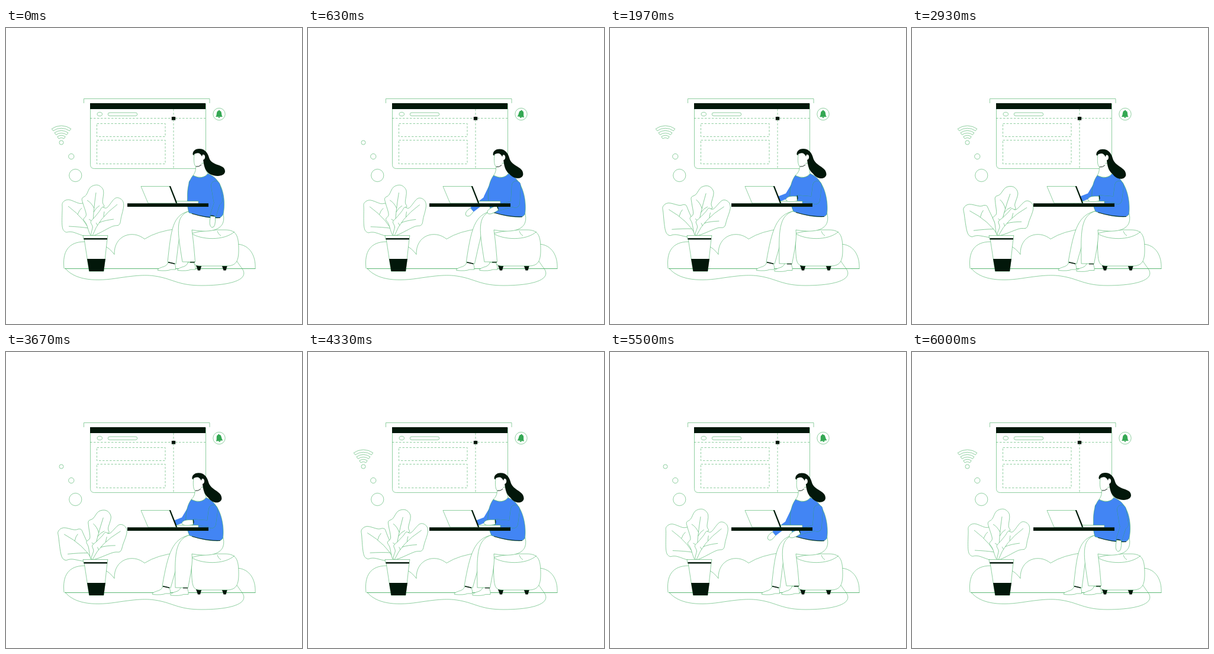
These frames come from a looping animation (500x500 px, 6030 ms). An HTML page with a canvas:

```html
<!DOCTYPE html>
<html lang="en">
<head>
<meta charset="utf-8">
<title>Working at a desk</title>
<style>
html, body { margin: 0; width: 100%; height: 100%; overflow: hidden; background: #fff; }
canvas { display: block; width: 500px; height: 500px; }
</style>
</head>
<body>
<canvas id="stage" width="500" height="500"></canvas>
<script>
const c = document.getElementById('stage').getContext('2d');
const LOOP = 6030;
const GREEN = '#34a853', DARK = '#02170a', BLUE = '#4285f4', WHITE = '#fff';
const THIN = 0.55;
const RAD = Math.PI / 180;

const clamp = v => Math.min(1, Math.max(0, v));
const seg = (t, a, b) => clamp((t - a) / (b - a));
const ease = p => p * p * (3 - 2 * p);
const mix = (a, b, k) => a + (b - a) * k;
const mixAll = (a, b, k) => a.map((v, i) => mix(v, b[i], k));
const wave = (t, period) => (1 - Math.cos(2 * Math.PI * t / period)) / 2;
// 0 -> 1 -> 0 with eased flanks
const hold = (t, a, b, d, e) => ease(seg(t, a, b)) - ease(seg(t, d, e));

function shape(d, fill, line, width = THIN) {
  const p = new Path2D(d);
  if (fill) { c.fillStyle = fill; c.fill(p); }
  if (line) { c.strokeStyle = line; c.lineWidth = width; c.stroke(p); }
}

const outline = (d, fill = WHITE) => shape(d, fill, GREEN);
const stroke = (d, color = GREEN, width = THIN) => shape(d, null, color, width);

function circle(x, y, r, ry = r) {
  outline(`M${x - r} ${y}a${r} ${ry} 0 1 0 ${2 * r} 0a${r} ${ry} 0 1 0 ${-2 * r} 0`);
}

function box(x, y, w, h, color) {
  c.fillStyle = color;
  c.fillRect(x, y, w, h);
}

function placed(x, y, degrees, draw) {
  c.save();
  c.translate(x, y);
  c.rotate(degrees * RAD);
  draw();
  c.restore();
}

// Smooth closed curve through points
function smooth(points) {
  const n = points.length, at = i => points[(i + n) % n];
  let d = `M${points[0]}`;
  for (let i = 0; i < n; i++) {
    const [a, b, e, f] = [at(i - 1), at(i), at(i + 1), at(i + 2)];
    d += `C${b.map((v, k) => v + (e[k] - a[k]) / 6)} ${e.map((v, k) => v - (f[k] - b[k]) / 6)} ${e}`;
  }
  return d + 'Z';
}

function browser() {
  stroke('M131.5 127V119.5H344V127');
  outline('M142.5 128H337.5V237.5H149.5Q142.5 237.5 142.5 230.5Z');
  box(142, 127, 195, 10, DARK);
  circle(158.3, 145.5, 4.2, 3.2);
  outline('M175 143H219a2.7 2.7 0 0 1 0 5.4H175a2.7 2.7 0 0 1 0 -5.4Z');
  c.setLineDash([3.5, 2.5]);
  stroke('M142 152.5H337M283 137V237M153.5 161.5h115.5v22h-115.5ZM153.5 189.5h115.5v40h-115.5Z');
  c.setLineDash([]);
  box(279.8, 150, 6.4, 5.6, DARK);
}

function bell(t) {
  circle(360, 145.5, 10.2);
  placed(360, 145.5, 9 * Math.sin(Math.PI * t / 1000), () => {
    shape('M-6 4.6C-3 2 -5.5 -5.5 -1 -5.6C-1 -7.4 1 -7.4 1 -5.6C5.5 -5.5 3 2 6 4.6ZM-1.7 4.9a1.7 1.7 0 0 0 3.4 0Z', GREEN);
  });
}

function wifi(t) {
  const p = t % (LOOP / 2);
  const shown = (off, on) => 1 - seg(p, off, off + 50) + seg(p, on, on + 50);
  const up = -Math.PI / 2, half = 0.62;
  for (let i = 0; i < 3; i++) {
    const r = 11.5 + 8.2 * i;
    c.globalAlpha = shown(400 - 145 * i, 680 + 135 * i) * shown(2360 - 80 * i, 2550 + 135 * i);
    c.beginPath();
    c.arc(93.5, 193, r, up - half, up + half);
    c.arc(93.5, 193, r - 4.2, up + half, up - half, true);
    c.closePath();
    c.strokeStyle = GREEN;
    c.lineWidth = THIN;
    c.stroke();
  }
  c.globalAlpha = shown(1910, 2000);
  circle(93.5, 193.5, 3.5);
  c.globalAlpha = 1;
  circle(110.3, 217, 4.6);
  circle(117.3, 249, 10.6);
}

function ground() {
  stroke('M98 406C95 378 105 361 133 361Q168 361 183 382.5C182 350 214 340 234 356.5Q255 343 290 339');
  stroke('M390 365C412 366 422 385 421 406');
  stroke('M100 406C115 424 145 429 185 423S240 416 262 421S295 435 330 435C380 435 415 425 397 404L390 394');
  stroke('M99 406.5H421.5', GREEN, 0.8);
}

// Each leaf is a chain of round lobes: x, y, radius, outward direction
const LEAVES = [
  { turn: -9.5, tip: 1, lobes: [[-42, -16, 11, 120], [-43, -50, 11, 215], [-20, -47, 9, 300]] },
  { turn: 11, tip: 2, lobes: [[-8, -28, 9, 180], [-11, -60, 9, 200], [4, -73, 13, 285], [10, -51, 8, 10]] },
  { turn: 7, tip: 2, lobes: [[4, -22, 9, 190], [18, -41, 8, 245], [40, -53, 11, 310], [34, -28, 13, 45]] }
];

function leaf({ tip, lobes }) {
  const edge = [[-2, 0]];
  for (const [x, y, r, dir] of lobes) {
    for (const k of [-60, 0, 60]) {
      edge.push([x + r * Math.cos((dir + k) * RAD), y + r * Math.sin((dir + k) * RAD)]);
    }
  }
  outline(smooth(edge));
  const [tx, ty] = lobes[tip];
  const bend = [tx * 0.25 - 2, ty * 0.55];
  stroke(`M-2 0Q${bend} ${tx} ${ty}`);
  lobes.forEach(([x, y, r], i) => {
    if (i === tip || r < 8) return;
    // a side vein leaves the main one below its lobe
    const u = clamp(y / ty * 0.75), v = 1 - u;
    const fx = v * v * -2 + 2 * u * v * bend[0] + u * u * tx;
    const fy = 2 * u * v * bend[1] + u * u * ty;
    stroke(`M${fx} ${fy}Q${mix(fx, x, 0.4)} ${mix(fy, y, 0.7)} ${x} ${y}`);
  });
}

function plant(t) {
  const sway = wave(t, LOOP);
  for (const l of LEAVES) placed(148, 351, l.turn * sway, () => leaf(l));
  outline('M132 356H171L165 411H140.5Z');
  outline('M130 350.5H172L171 356H131Z');
  box(131.5, 355, 39.5, 2.4, DARK);
  shape('M137 390H168L165 411H140.5Z', DARK);
}

function pouf() {
  for (const x of [321, 364.5]) shape(`M${x} 401h9.5l-2.5 8.5h-4Z`, DARK);
  outline('M313 347Q340 340 370 341C390 341 393 352 393 375C393 395 388 402 372 402H330C313 402 314 396 313 347Z');
  stroke('M313 347C330 358 368 360 386 344M357 343Q358 348 363 351');
}

function foot(heel, y) {
  outline(`M${heel - 13} ${y - 14}Q${heel - 14} ${y - 8} ${heel - 23} ${y - 6}Q${heel - 32} ${y - 3} ${heel - 30} ${y - 0.5}` +
    `Q${heel - 14} ${y + 1} ${heel - 8} ${y - 2}H${heel}Q${heel + 1} ${y - 6} ${heel - 2} ${y - 13}Z`);
}

function legs(t) {
  const a = -9 * hold(t, 100, 1000, 4400, 5010);
  const b = -12 * hold(t, 630, 1500, 4700, 5450);
  foot(286.5 + a, 410);
  outline(`M311 309C281 315 ${279 + a * 0.6} 340 ${273 + a} 395L${287 + a} 398.5C${291 + a / 2} 370 292 345 300 330Z`);
  stroke(`M${274 + a} 395.8L${285 + a} 398.3`, DARK, 1.4);
  const cuff = 395 - b * 0.25;
  foot(320 + b, 410 - b * 0.12);
  outline(`M311 309C284 316 ${290 + b * 0.4} 345 ${298 + b} ${cuff}H${319.5 + b}C${318 + b / 2} 375 316 355 314 341` +
    'C335 345 374 347 367 314Z');
  stroke(`M${311 + b} ${cuff + 0.6}h8`, DARK, 1.2);
}

function sleeve(s, e, w, upper, lower, edged) {
  const pass = (grow, color) => {
    c.lineCap = 'round';
    stroke(`M${s}L${e}`, color, upper + grow);
    c.lineCap = 'butt';
    stroke(`M${e}L${w}`, color, lower + grow);
  };
  if (edged) pass(THIN, GREEN);
  pass(0, BLUE);
}

// Elbow and wrist at rest, passing the table edge, and on the keyboard
const FAR = [[322, 285, 324, 304], [303, 287, 277, 307], [303, 282, 285, 289]];
const NEAR = [[358, 291, 349.5, 318], [350, 296, 320, 304], [347, 290, 316, 287.5]];
const MID = 0.545;

function armPose(poses, q) {
  const [ex, ey, wx, wy] = q < MID ? mixAll(poses[0], poses[1], q / MID)
                                   : mixAll(poses[1], poses[2], (q - MID) / (1 - MID));
  return { elbow: [ex, ey], wrist: [wx, wy], angle: Math.atan2(wy - ey, wx - ex) / RAD };
}

function hand([x, y], angle, len) {
  placed(x, y, angle, () => outline(`M0 -4Q${len} -7 ${len} 0Q${len * 0.9} 6 0 4Z`));
}

function farArm(q) {
  const { elbow, wrist, angle } = armPose(FAR, q);
  if (q > 0.2) hand(wrist, angle - 6, 14);
  sleeve([315, 262], elbow, wrist, 13, 9, false);
}

function nearSleeve(q) {
  const { elbow, wrist } = armPose(NEAR, q);
  sleeve([mix(354, 350, q), 266], elbow, wrist, 15, 10, true);
}

function nearHand(t, q) {
  const { wrist: [x, y], angle } = armPose(NEAR, q);
  const tap = q > 0.98 ? Math.sin(Math.PI * t / 160) * 0.8 : 0;
  placed(x, y, angle, () => shape('M0 -5Q4 0 0 5Q-3 0 0 -5Z', DARK));
  hand([x, y + tap], angle - mix(12, 8, q), 19);
}

function torso(lean) {
  const m = (a, b) => mix(a, b, lean);
  const left = m(316, 313), right = m(341, 338), hem = m(321, 319);
  outline(`M${left} 249C${m(309, 307)} 257 ${m(306, 303)} 270 ${m(306.5, 304)} 288Q305 300 ${m(309, 310)} ${hem - 9}` +
    `C326 ${hem - 4} 340 ${hem} 354 ${hem}Q364 ${hem + 1} ${m(367, 366.5)} 314` +
    `C${m(371, 369)} 295 ${m(369, 364)} 256 ${right} 246Q${m(332, 329)} 257 ${left} 249Z`, BLUE);
  stroke(`M314 ${hem - 7.5}Q338 ${hem} 362 ${hem - 0.4}`, DARK, 0.9);
}

function head(t, lean) {
  const nod = wave(t, LOOP / 3);
  const dx = -4.2 * nod, dy = 0.8 * nod;
  const left = mix(316, 313, lean), right = mix(341, 338, lean);
  outline(`M${320 + dx} 230Q${322 + dx} 242 ${left} 249Q${left + 16} 257 ${right} 246Q${336 + dx / 2} 240 ${336 + dx} 228Z`);
  c.save();
  c.translate(dx, dy);
  const x = mix(370, 365.5, lean), y = mix(242, 247, lean);
  shape(`M315.5 214C315 207 321 204 326 204C337 204 341 212 343 219C347 234 ${x} ${y - 13} ${x} ${y}` +
    `C${x} ${y + 8} ${x - 14} ${y + 11} 343 246C335 240 334 230 333 222Z`, DARK);
  shape('M318 213C317 222 317 232 321 234Q329 235 332.5 223C338 222 337 212 332 214L331 217Q327 208 318 213Z', WHITE);
  stroke('M318 213C317 222 317 232 321 234');
  stroke('M321 234Q326 235 330 231', DARK, 0.9);
  c.restore();
}

function laptop() {
  outline('M228 267.5H276L288 296H240Z');
  shape('M275.8 267H278L289.5 296H287Z', DARK);
  outline('M288 292.5H325V296.5H289.5Z');
}

function draw(t) {
  box(0, 0, 500, 500, WHITE);
  const reach = hold(t, 100, 1100, 5110, 5950);
  const lean = clamp(reach * 1.5);
  ground();
  browser();
  bell(t);
  wifi(t);
  plant(t);
  pouf();
  legs(t);
  farArm(reach);
  torso(lean);
  nearSleeve(reach);
  head(t, lean);
  laptop();
  nearHand(t, reach);
  box(205, 296.2, 137, 5.8, DARK);
}

const start = performance.now();
function tick() {
  draw((performance.now() - start) % LOOP);
  requestAnimationFrame(tick);
}
tick();
</script>
</body>
</html>
```
